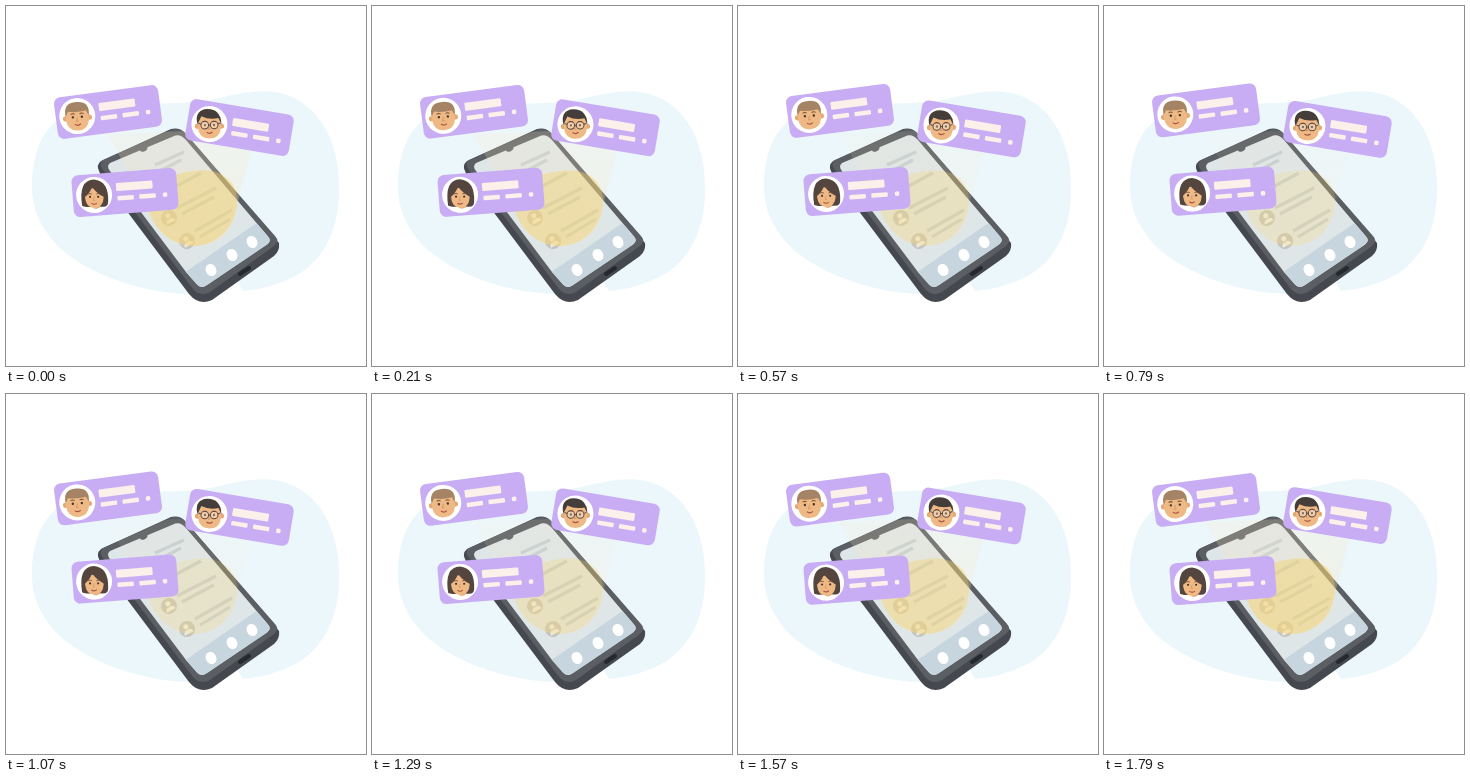
An HTML page for the animation above (1.87 s loop, 360 px wide and 360 px high).

```html
<!DOCTYPE html>
<html lang="en">
<head>
<meta charset="utf-8">
<title>Contact cards</title>
<style>
  html, body { margin: 0; width: 100%; height: 100%; overflow: hidden; background: #fff; }
  svg { display: block; width: 100vw; height: 100vh; }
</style>
</head>
<body>
<svg viewBox="0 0 360 360">
  <defs>
    <linearGradient id="beamFill" x1="0" y1="0" x2="0" y2="1">
      <stop offset="0" stop-color="#f9e7c6" stop-opacity=".65"/>
      <stop offset="1" stop-color="#f8e2ab"/>
    </linearGradient>
    <clipPath id="screenClip">
      <path id="screenShape" d="M104 157Q100 160 104 165L180 266L191 278.500Q195 283 201 279L261 238.500Q266 235 262 230.500L180 134Q174 127 167 130.500Z"/>
    </clipPath>
    <g id="bars" fill="#fbf0ea">
      <rect x="-8.5" y="-10" width="36.5" height="8" rx="1"/>
      <rect x="-8" y="3" width="16.5" height="4.5" rx="1"/>
      <rect x="14" y="3" width="16.5" height="4.5" rx="1"/>
      <rect x="37.5" y="3" width="4.5" height="4.5" rx="1.5"/>
    </g>
    <g id="features">
      <g fill="#44352f"><circle cx="-4.5" cy="1" r="1.2"/><circle cx="4.5" cy="1" r="1.2"/></g>
      <path d="M-6.5-2Q-4.5-3.5-2.5-2M2.5-2Q4.5-3.5 6.5-2" fill="none" stroke="#76533b"/>
      <path d="M0 1L-1 5H1" fill="none" stroke="#d59a6a"/>
      <path d="M-3 8Q0 10.5 3 8" fill="none" stroke="#a95443" stroke-width="1.2"/>
    </g>
    <g id="manHead">
      <g fill="#e3aa74"><circle cx="-12" cy="2" r="2.6"/><circle cx="12" cy="2" r="2.6"/></g>
      <path d="M-11.500-7Q0-13 11.500-7V4Q10 14.500 0 14.500Q-10 14.500-11.500 4Z" fill="#efb985"/>
    </g>
  </defs>

  <path d="M26 185C25 151 35 121 60 109C95 91 171 103 214 92C246 84 273 80 298 98C323 116 333 149 333 180C334 216 322 250 293 268C276 278 257 283 237 285L224 264L181 288C130 286 84 267 57 245C38 228 27 207 26 185Z" fill="#ecf7fc"/>

  <g id="phone">
    <path d="M95 155Q90 159 93 165L96 172L183 288Q193 300 206 294L268 250Q274 245 273 237L264 226L180 128Q174 121 165 123Z" fill="#45494f"/>
    <path d="M97 154Q92 158 97 164L187 283Q194 291 204 286L268 240Q274 235 269 230L180 128Q173 121 165 124Z" fill="#5b5f64"/>
    <use href="#screenShape" fill="#dfe6e8"/>
    <g clip-path="url(#screenClip)">
      <path d="M175 269L252 216L280 238L198 296Z" fill="#c7d6de"/>
      <g id="lines" fill="none" stroke="#c5cfd3" stroke-width="3.2"/>
    </g>
    <ellipse cx="137.500" cy="142.500" rx="4" ry="3" transform="rotate(-24 137.500 142.500)" fill="#5b5f64"/>
    <path d="M234 268L243 262" stroke="#25292e" stroke-width="4" stroke-linecap="round"/>
    <g id="buttons" fill="#fff"/>
  </g>

  <path id="beam" d="M101 128L207 124L245 146L231 199Q229 238 188 240Q151 239 141 198Z" fill="url(#beamFill)"/>
  <path id="spot" d="M141 199C145 180 162 168 188 165C213 161 231 174 231 194C231 219 212 240 188 240C164 239 146 222 141 199Z" fill="#f6d05f"/>

  <g id="cards"></g>
</svg>
<script>
const LOOP = 1870;
const byId = id => document.getElementById(id);

const line = (x1, y1, x2, y2) => `<path d="M${x1} ${y1}L${x2} ${y2}"/>`;
const person = (x, y) => `<g transform="translate(${x} ${y}) rotate(-28)" stroke="none">
  <circle r="8" fill="#c5c5bd"/><circle cy="-2.500" r="2.500" fill="#eeece4"/>
  <path d="M-5 5Q-4 0 0 1Q4 0 5 5Z" fill="#eeece4"/></g>`;

byId("lines").innerHTML =
  line(149, 159, 178, 146) + line(154, 165, 175, 154) +
  line(165, 183, 195, 167) +
  line(171, 202, 210, 182) + line(176, 208, 208, 191) +
  line(189, 225, 226, 204) + line(194, 231, 224, 213) +
  person(163, 212) + person(181, 235);

byId("buttons").innerHTML = [[205, 264], [226, 249], [246, 236]].map(([x, y]) =>
  `<ellipse cx="${x}" cy="${y}" rx="5.200" ry="6.300" transform="rotate(-28 ${x} ${y})"/>`).join("");

const portraits = {
  shortHair: `<use href="#manHead"/>
    <path d="M-11.500 0Q-14-14 0-14Q14-14 11.500 0L9-5Q0-3-9-5Z" fill="#a58365"/>
    <use href="#features"/>`,
  glasses: `<use href="#manHead"/>
    <path d="M-12 0Q-15-12-5-15Q11-17 12 0L9-6Q0-4-8-8Z" fill="#453d3a"/>
    <use href="#features"/>
    <g fill="#fff" fill-opacity=".3" stroke="#5b4a43">
      <circle cx="-4.700" cy="1" r="3.800"/><circle cx="4.700" cy="1" r="3.800"/>
      <path d="M-1 1H1M-8.500 0L-11-1M8.500 0L11-1"/></g>`,
  bob: `<path d="M-12 11Q-16-15 0-15.500Q15-14 14 7Q14 12 9 12H-8Z" fill="#54453f"/>
    <path d="M-1 8H6V15H-1Z" fill="#e3aa74"/>
    <path d="M-4 17L-2 13L2 14L7 12L9 16Q2 19-4 17Z" fill="#fff"/>
    <path d="M-9-4Q0-10 9.500-4V3Q9 13 0 13Q-8 13-9 3Z" fill="#efb985"/>
    <path d="M-11 3Q-10-8-4-12Q9-13 12 3Q4 0-2-8Q-5 0-11 3Z" fill="#54453f"/>
    <g transform="translate(0 1) scale(.9)"><use href="#features"/></g>`
};

// inset moves a card's contents; tilt turns only its portrait
const cards = [
  { x: 102, y: 106, angle: -7.5, drift: -1.7, face: "shortHair", inset: "0 0", tilt: 3 },
  { x: 233.5, y: 121.5, angle: 9.5, drift: 2, face: "glasses", inset: "0.8 1.6", tilt: -10 },
  { x: 119, y: 186.5, angle: -4.5, drift: -1.5, face: "bob", inset: "0 0", tilt: 4 }
];

byId("cards").innerHTML = cards.map(({ face, inset, tilt }) => `<g>
  <rect x="-52.500" y="-21" width="105" height="42" rx="6.500" fill="#c8adf4"/>
  <g transform="translate(${inset})">
    <circle cx="-31" r="18" fill="#fff"/>
    <g transform="translate(-31 0) rotate(${tilt})">${portraits[face]}</g>
    <use href="#bars"/></g></g>`).join("");
const cardNodes = [...byId("cards").children];

function draw(now) {
  const glow = (1 + Math.cos(now % LOOP / LOOP * 2 * Math.PI)) / 2;
  byId("beam").setAttribute("opacity", 0.1 + 0.22 * glow);
  byId("spot").setAttribute("opacity", 0.17 + 0.25 * glow);
  cards.forEach(({ x, y, angle, drift }, i) =>
    cardNodes[i].setAttribute("transform",
      `translate(${x} ${y + drift * (1 - glow)}) rotate(${angle})`));
  requestAnimationFrame(draw);
}
draw(performance.now());
</script>
</body>
</html>
```
